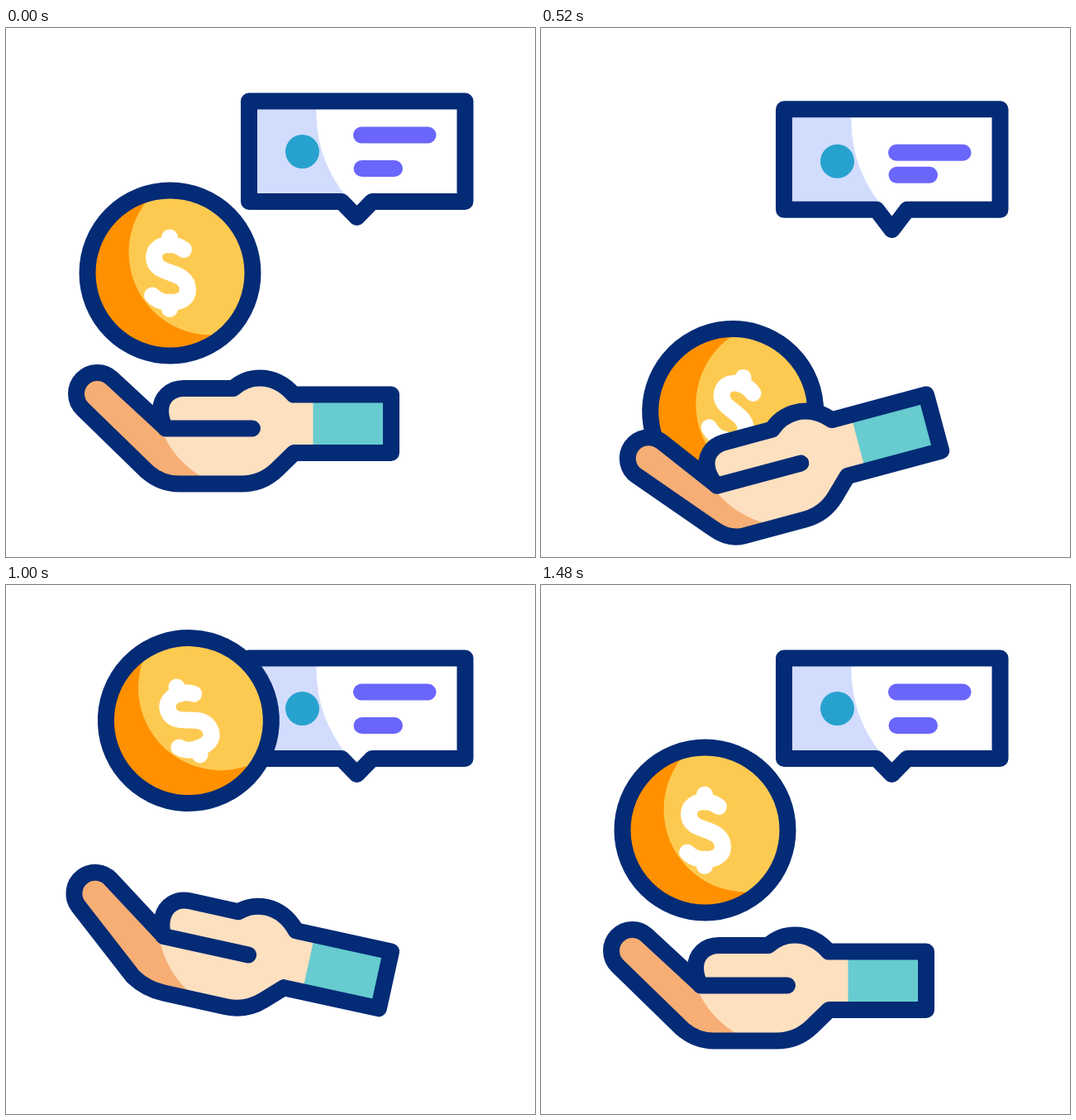
Write an HTML page with a canvas that moves like this. It is 640 by 640 pixels and loops after 2000 ms.

```html
<!DOCTYPE html>
<html lang="en">
<head>
<meta charset="utf-8">
<title>Coin toss</title>
<style>
  html, body { margin: 0; height: 100%; overflow: hidden; background: #fff; }
  canvas { display: block; width: 100vw; height: 100vh; }
</style>
</head>
<body>
<canvas id="stage" width="640" height="640"></canvas>
<script>
const ctx = document.getElementById('stage').getContext('2d');
const NAVY = '#032b76';
const LOOP = 2000;
const rad = deg => deg * Math.PI / 180;

// Eased progress from a to b; tail > 1 lengthens the slow end.
function ease(t, a, b, tail = 1) {
  const u = Math.min(1, Math.max(0, (t - a) / (b - a)));
  const v = 1 - (1 - u) ** tail;
  return v * v * (3 - 2 * v);
}

// Three phases: wind up, swing past, settle.
const phases = (t, [a, b, c, d], tail) =>
  [ease(t, a, b), ease(t, b, c), ease(t, c, d, tail)];
const swing = ([s1, s2, s3], low, high) =>
  low * s1 + (high - low) * s2 - high * s3;

function stroke(path, color = NAVY) {
  ctx.strokeStyle = color;
  ctx.stroke(path);
}

function fill(path, color) {
  ctx.fillStyle = color;
  ctx.fill(path);
}

function disc(x, y, r) {
  const path = new Path2D();
  path.arc(x, y, r, 0, 2 * Math.PI);
  return path;
}

function clipped(shape, draw) {
  ctx.save();
  ctx.clip(shape);
  draw();
  ctx.restore();
}

const lilacSide = new Path2D('M290 80H375.500V98Q374 157 412 205V215H290Z');
const bars = [
  { path: new Path2D('M430 129.500H510.500'), low: 53.8, high: -32 },
  { path: new Path2D('M430.500 170H470'), low: 40.1, high: -45 }
];

function drawBubble(t) {
  const p = phases(t, [80, 405, 682, 917]);
  const shift = (low, high, draw) => {
    ctx.save();
    ctx.translate(0, swing(p, low, high));
    draw();
    ctx.restore();
  };
  shift(28.5, -20.7, () => {
    const tip = 229 + swing(p, 8.4, 0);
    const frame = new Path2D(
      `M294 88.500H555.500V210H443L424.500 ${tip}L406 210H294Z`);
    fill(frame, '#fff');
    clipped(frame, () => fill(lilacSide, '#d2dcfd'));
    stroke(frame);
  });
  shift(40.1, -34.5, () => fill(disc(358.5, 149.5, 20.5), '#27a2cf'));
  for (const bar of bars) {
    shift(bar.low, bar.high, () => stroke(bar.path, '#6a66fb'));
  }
}

const dollar = new Path2D(
  'M16.500 -28.500C11 -32.500 6 -34.500 -.500 -34.500C-11 -34.500 -19.500 -29 -19.500 -19.500' +
  'C-19.500 5 21.500 -6 21.500 20.500C21.500 31 12 35.500 -.500 35.500C-9 35.500 -16 33 -21.500 27' +
  'M-.500 -43V-34M-.500 35V43.500');

function drawCoin(t, turn) {
  const p = phases(t, [80, 510, 850, 1480], 1.24);
  const [s1, s2, s3] = p;
  const x = 33.5 * s1 ** 2.5 + 66 * s2 * (1 - s2) - 33.5 * (1 - (1 - s3) ** 1.8);
  const face = disc(0, 0, 100);
  ctx.save();
  ctx.translate(198.5 + x, 296.5 + swing(p, 168.6, -165.8));
  ctx.rotate(rad(turn));
  fill(face, '#ff9000');
  clipped(face, () => fill(disc(50, -25, 100), '#fdca51'));
  stroke(face);
  stroke(dollar, '#fff');
  ctx.restore();
}

const palmTop =
  'M193 484C189 478 187 471 187 463C187 447 199 436 215 436H275' +
  'C284 428 295 423.500 307 423.500C322 423.500 336 430 348 443.500H466V514H348.500' +
  'L328 534Q310 551.500 285 551.500H209';
const thumbShade = new Path2D('M187 484Q203 525 242 546V570H40V380H120Z');
const cuff = new Path2D('M371.500 430H470V525H371.500Z');
const fingerGap = new Path2D('M193 484.500H298');

function drawHand(angle) {
  const bend = -0.75 * angle;
  const knee = 0.35 * bend;
  const outline = new Path2D(
    `${palmTop}Q${188 + knee / 2} 551.500 ${171 + knee} ${537 - knee}`);
  outline.arc(110.5 + bend, 442.5 - bend, 25.5,
    rad(134 - 0.35 * angle), rad(312.5 - 0.68 * angle));
  outline.closePath();

  ctx.save();
  ctx.translate(466, 443.5);
  ctx.rotate(rad(angle));
  ctx.translate(-466, -443.5);
  fill(outline, '#fde0bf');
  clipped(outline, () => {
    fill(thumbShade, '#f6ae74');
    fill(cuff, '#67cbd0');
  });
  stroke(outline);
  stroke(fingerGap);
  ctx.restore();
}

function render(now) {
  const t = now % LOOP;
  const wrist = phases(t, [80, 520, 870, 1480], 1.52);
  ctx.fillStyle = '#fff';
  ctx.fillRect(0, 0, 640, 640);
  ctx.lineWidth = 20;
  ctx.lineCap = ctx.lineJoin = 'round';
  drawBubble(t);
  drawCoin(t, swing(wrist, 17.5, -24.5));
  drawHand(swing(wrist, -15, 16));
  requestAnimationFrame(render);
}
requestAnimationFrame(render);
</script>
</body>
</html>
```
